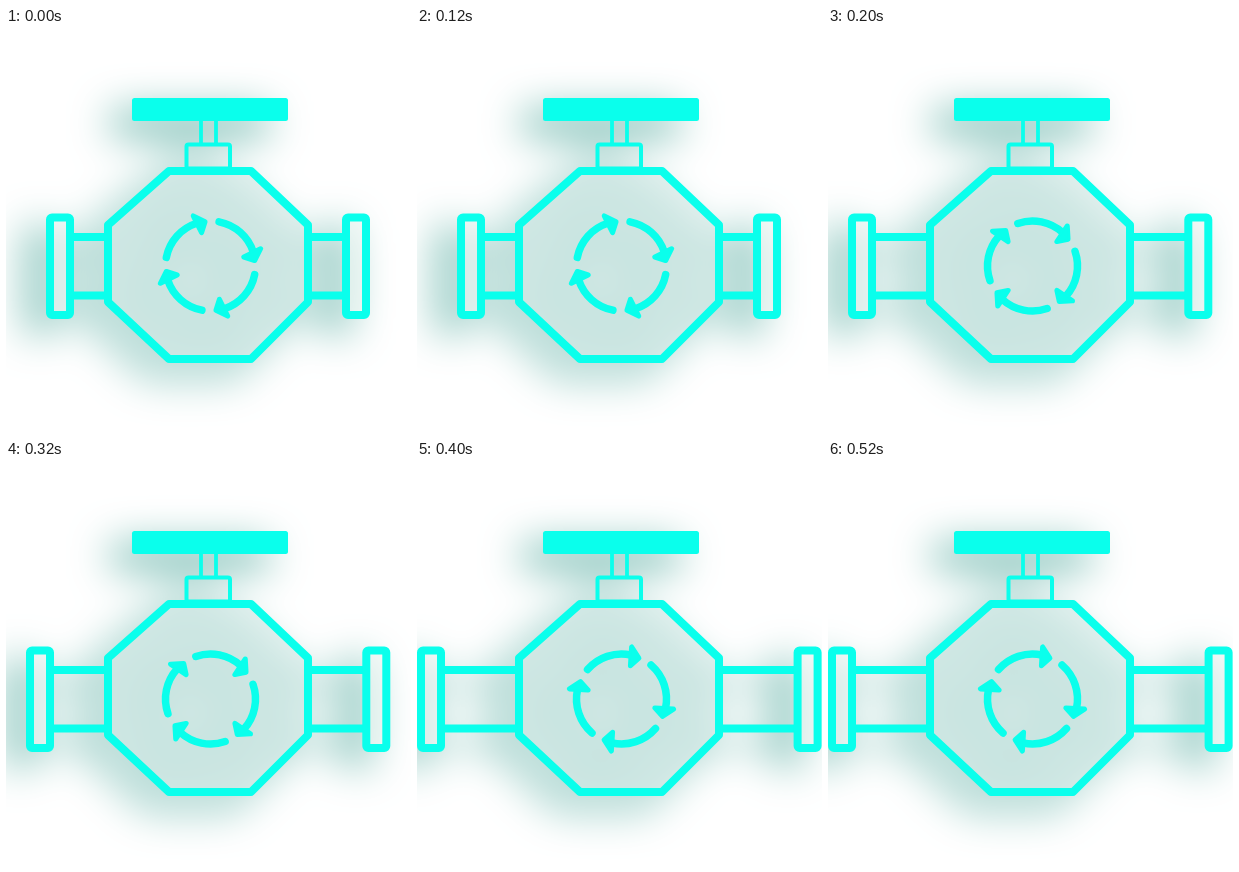
Recreate the animation shown at these times as an HTML page with a canvas. Size 405x405 px, loop 600 ms.

```html
<!DOCTYPE html>
<html lang="en">
<head>
<meta charset="utf-8">
<title>Valve</title>
<style>
html, body { margin: 0; width: 100%; height: 100%; overflow: hidden; background: #fff; }
canvas { display: block; }
</style>
</head>
<body>
<canvas id="stage" width="405" height="405"></canvas>
<script>
const SIZE = 405, PAD = 90, FAR = 2000;
const STEP_MS = 200, STEPS = 3;
const INK = '#0affec', SHADOW = 'rgb(97,177,166)';
const ctx = document.getElementById('stage').getContext('2d');

const mask = document.createElement('canvas');
mask.width = mask.height = SIZE + 2 * PAD;
const maskCtx = mask.getContext('2d');

function box(x, y, w, h, r) {
  const p = new Path2D();
  p.roundRect(x, y, w, h, r);
  return p;
}

const body = new Path2D(
  'M163 143H245L302 197V274L245 331H163L102 274V197Z');
const collar = box(180.5, 116.5, 43.5, 24, 2);
const handle = box(126, 70, 156, 23, 2.5);
const stem = new Path2D('M195 92V116M210 92V116');

function stroke(c, path, width) {
  c.lineWidth = width;
  c.stroke(path);
}

function polar(r, deg) {
  const a = (deg - 90) * Math.PI / 180;
  return [r * Math.cos(a), r * Math.sin(a)];
}

// Four arrows chasing each other clockwise
function drawArrows(c, turn) {
  c.save();
  c.translate(204.5, 238);
  c.rotate(turn * Math.PI / 180);
  for (let i = 0; i < 4; i++) {
    c.lineCap = 'round';
    c.lineWidth = 7.5;
    c.beginPath();
    c.arc(0, 0, 45, -79 * Math.PI / 180, -18 * Math.PI / 180);
    c.stroke();
    c.beginPath();
    c.moveTo(...polar(53, 71));
    c.lineTo(...polar(34.5, 75));
    c.lineTo(...polar(44.5, 83));
    c.closePath();
    c.lineWidth = 5;
    c.stroke();
    c.fill();
    c.rotate(Math.PI / 2);
  }
  c.restore();
}

function drawValve(c, step, fills) {
  const left = 44 - 20 * step, right = 340 + 20.3 * step;
  const flanges = [left, right].map(x => box(x, 189.5, 20, 97.5, 2));

  c.fillStyle = fills.body;
  c.fill(body);
  c.fillStyle = fills.flange;
  flanges.forEach(f => c.fill(f));

  c.fillStyle = c.strokeStyle = INK;
  c.lineJoin = 'round';
  c.lineCap = 'butt';
  c.fill(handle);
  stroke(c, stem, 3.8);
  stroke(c, collar, 4);
  for (const y of [209, 267.5]) {
    c.fillRect(left + 20, y - 4, 82 - left, 8);
    c.fillRect(302, y - 4, right - 302, 8);
  }
  stroke(c, body, 8);
  flanges.forEach(f => stroke(c, f, 8));
  drawArrows(c, 60 * step);
}

// Soft shadow only: the mask itself is drawn out of sight
function drawShadow(step) {
  maskCtx.setTransform(1, 0, 0, 1, 0, 0);
  maskCtx.clearRect(0, 0, mask.width, mask.height);
  maskCtx.translate(PAD, PAD);
  drawValve(maskCtx, step, { body: 'rgba(0,0,0,.34)', flange: 'rgba(0,0,0,.5)' });
  ctx.save();
  ctx.shadowColor = SHADOW;
  ctx.shadowBlur = 42;
  ctx.shadowOffsetX = FAR - 20;
  ctx.shadowOffsetY = 14;
  ctx.drawImage(mask, -PAD - FAR, -PAD);
  ctx.restore();
}

let shown = -1;
function frame(now) {
  const step = Math.floor(Math.max(0, now) / STEP_MS) % STEPS;
  if (step !== shown) {
    shown = step;
    ctx.fillStyle = '#fff';
    ctx.fillRect(0, 0, SIZE, SIZE);
    drawShadow(step);
    drawValve(ctx, step, {
      body: 'rgba(214,236,232,.6)',
      flange: 'rgba(240,248,246,.6)'
    });
  }
  requestAnimationFrame(tick);
}

const start = performance.now();
function tick() { frame(performance.now() - start); }
tick();
</script>
</body>
</html>
```
